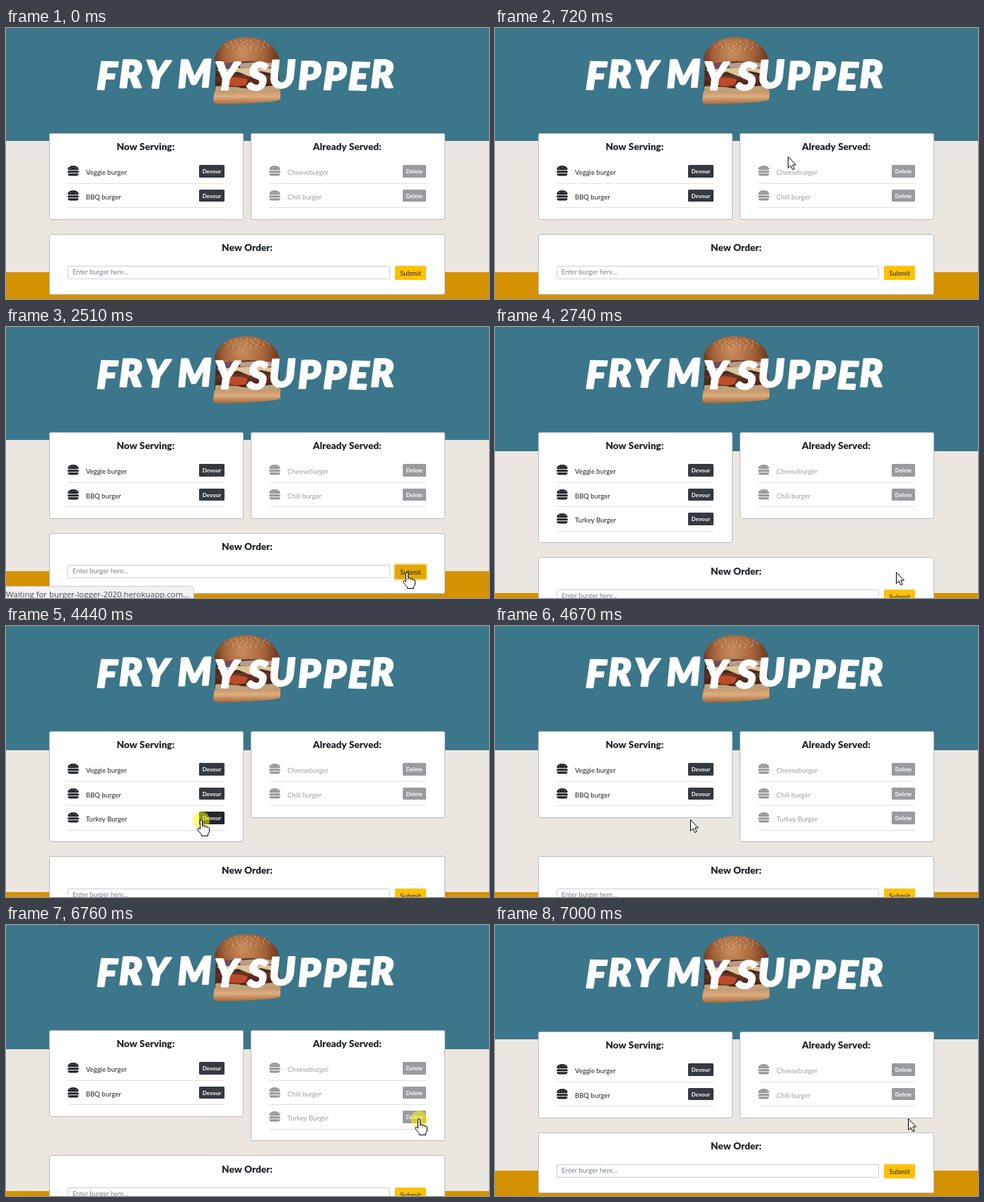
Animation, 683 px wide and 384 px high, one loop 7.93 s. Source, as an HTML page with a canvas:

```html
<!DOCTYPE html>
<html lang="en">
<head>
<meta charset="utf-8">
<title>Burger orders</title>
<style>
  html, body { margin: 0; width: 100%; height: 100%; overflow: hidden; background: #ebe7e0; }
  canvas { display: block; width: 683px; height: 384px; }
</style>
</head>
<body>
<canvas id="stage"></canvas>
<script>
const W = 683, H = 384, LOOP = 7930;
const canvas = document.getElementById('stage');
const ctx = canvas.getContext('2d');
const scale = window.devicePixelRatio || 1;
canvas.width = W * scale;
canvas.height = H * scale;

const INK = '#212529', MUTED = '#a19f9d';
const ROW_PITCH = 34.5;

// Pointer moves: the pointer jumps along each path in equal time steps.
const MOVES = [
  { start: 170, end: 400, steps: 4, path: [[658, -41], [474, 122]] },
  { start: 550, end: 1330, steps: 11, path: [[474, 122], [253, 342]] },
  { start: 1720, end: 2100, steps: 6, path: [[253, 342], [567, 347]] },
  { start: 3670, end: 4210, steps: 8, path: [[567, 347], [276, 274]] },
  { start: 5060, end: 5060, steps: 1, path: [[276, 274], [278, 275]] },
  { start: 5460, end: 6230, steps: 11, path: [[278, 275], [383, 281], [488, 285], [576, 280]] },
  { start: 6300, end: 6380, steps: 2, path: [[576, 280], [584, 274]] },
];
const CLICKS = [[1410, 1480], [2260, 2430], [4440, 4590], [6760, 6920]];
const STATUS = [[2430, 2740], [4590, 4670], [6920, 7000]];
const HAND = [[2100, 2740], [4210, 4670], [6230, 7000]];

const within = (t, spans) => spans.some(([a, b]) => t >= a && t < b);

function pointerAt(t) {
  const move = MOVES.filter(m => t >= m.start).pop();
  if (!move) return null;
  const { start, end, steps, path } = move;
  const gap = (end - start) / Math.max(1, steps - 1);
  const step = t >= end ? steps : Math.floor((t - start + 5) / gap) + 1;
  const along = step / steps * (path.length - 1);
  const i = Math.min(Math.floor(along), path.length - 2);
  const [a, b] = [path[i], path[i + 1]];
  return [0, 1].map(k => Math.round(a[k] + (b[k] - a[k]) * (along - i)));
}

function rect(x, y, w, h, fill, radius = 0, stroke) {
  ctx.beginPath();
  ctx.roundRect(x, y, w, h, radius);
  if (fill) { ctx.fillStyle = fill; ctx.fill(); }
  if (stroke) { ctx.strokeStyle = stroke; ctx.lineWidth = 1; ctx.stroke(); }
}

function shape(d, fill, stroke, width = 1) {
  const path = new Path2D(d);
  ctx.fillStyle = fill;
  ctx.fill(path);
  if (stroke) {
    ctx.strokeStyle = stroke;
    ctx.lineWidth = width;
    ctx.stroke(path);
  }
}

function text(str, x, y, size, color, { weight = 400, align = 'left', family = 'Lato' } = {}) {
  ctx.font = `${weight} ${size}px "${family}", sans-serif`;
  ctx.textAlign = align;
  ctx.fillStyle = color;
  ctx.fillText(str, x, y);
}

const heading = (str, x, y) => text(str, x, y, 13.6, INK, { weight: 900, align: 'center' });

function gradient(y0, y1, ...colors) {
  const g = ctx.createLinearGradient(0, y0, 0, y1);
  colors.forEach((c, i) => g.addColorStop(i / (colors.length - 1), c));
  return g;
}

function photo() {
  shape('M297 48Q340 44 385 48L387 92Q340 97 295 92Z', '#4a2a1e');
  shape('M295 89Q340 84 388 87L388 101Q383 104 378 104Q340 108 301 108Q293 108 293 102Z',
    gradient(86, 108, '#c18a5c', '#dcae80', '#a8683a'));
  shape('M296 83Q310 78 325 83T355 83T387 81L386 88Q340 93 296 89Z', '#bda27c');
  shape('M297 69Q340 64 386 68L387 81Q340 86 296 82Z', gradient(66, 84, '#6d3a26', '#432016'));
  shape('M312 71Q330 68 342 73L339 81Q326 85 311 80Z', '#bd4a28');
  shape('M298 59Q340 54 386 58L374 64L360 61L345 69L328 62L306 66Z', '#dcc49a');
  shape('M297 48Q312 45 330 51L328 57Q310 60 298 56Z', '#6d4c5c');
  shape('M330 50Q358 47 386 49L384 55Q356 59 331 56Z', '#b99c8c');
  const bun = ctx.createRadialGradient(334, 36, 3, 340, 36, 50);
  bun.addColorStop(0, '#c68a5a');
  bun.addColorStop(0.55, '#a3623a');
  bun.addColorStop(1, '#5f2f18');
  shape('M295 46C295 28 314 13 338 13C365 12 385 27 387 47Q382 51 370 49Q340 45 309 50Q297 52 295 46Z', bun);
  ctx.fillStyle = '#dcbd92';
  for (let i = 0; i < 46; i++) {
    const angle = i * 2.4, r = Math.sqrt(i / 46);
    ctx.beginPath();
    ctx.ellipse(341 + 34 * r * Math.cos(angle), 24 + 8 * r * Math.sin(angle), 1, 0.6, angle, 0, 7);
    ctx.fill();
  }
}

function markerWord(word, x, y) {
  ctx.font = 'italic 900 54px "Lato", sans-serif';
  ctx.textAlign = 'left';
  ctx.fillStyle = ctx.strokeStyle = '#fff';
  ctx.lineWidth = 2;
  ctx.lineJoin = 'round';
  [...word].forEach((letter, i) => {
    ctx.save();
    ctx.translate(x, y + 1.5 * Math.sin(i * 2.1 + x));
    ctx.rotate(0.03 * Math.sin(i * 3.7 + x));
    ctx.fillText(letter, 0, 0);
    ctx.strokeText(letter, 0, 0);
    ctx.restore();
    x += ctx.measureText(letter).width + 3;
  });
}

function burgerIcon(x, y, color) {
  ctx.save();
  ctx.translate(x, y);
  shape('M1.8 6.2Q0 6.2 .5 4.2Q2.5 0 8 0T15.5 4.2Q16 6.2 14.2 6.2Z', color);
  rect(0, 7.2, 16, 3, color, 1.5);
  shape('M.5 11.2H15.5V12Q15.5 14.4 13 14.4H3Q.5 14.4 .5 12Z', color);
  ctx.fillStyle = '#fff';
  for (const [dx, dy] of [[4.2, 3.6], [8, 2.2], [11.8, 3.6]]) ctx.fillRect(dx - 0.5, dy - 0.4, 1, 0.8);
  ctx.restore();
}

function orderCard(x, title, items, served, hovered) {
  const bottom = items.length === 3 ? 305.5 : 271.5;
  rect(x + 0.5, 149.5, 274, bottom - 149.5, '#fff', 2, '#b9babb');
  heading(title, x + 136.5, 173);
  items.forEach((item, i) => {
    const offset = i * ROW_PITCH;
    const top = Math.round(194 + offset);
    const height = Math.round(211.8 + offset) - top;
    const width = served ? 33 : 36;
    const fill = served ? '#999b9f' : hovered === i ? '#23272b' : '#343a40';
    burgerIcon(x + 26, top + 1, served ? '#979797' : INK);
    text(item, x + 52, top + 14, 9.5, served ? MUTED : INK);
    rect(x + 248 - width, top, width, height, fill, 1.5);
    text(served ? 'Delete' : 'Devour', x + 248 - width / 2, top + 11.5, 8, '#fff', { weight: 700, align: 'center' });
    rect(x + 26, Math.floor(220 + offset), 222, 1, '#dfe1e3');
  });
}

function orderForm(t, tall) {
  rect(61.5, tall ? 326.5 : 292.5, 559, 85, '#fff', 2, '#b9babb');
  const y = tall ? 35 : 0;
  heading('New Order:', 341, 316 + y);

  const focused = t >= 1410 && t < 2260;
  const filled = t >= 1550 && t < 2430;
  if (focused) rect(86, 336, 458, 21, '#bfdeff', 2);
  rect(87.5, 337.5 + y, 455, 18, '#fff', 1.5, focused ? '#80bdff' : '#ced0d2');
  text(filled ? 'Turkey Burger' : 'Enter burger here...', 94, 349 + y, 9.4, filled ? '#495057' : '#7b8188');
  if (t >= 1550 && t < 1720) rect(151, 341, 1, 10, '#222');

  const pressed = t >= 2260 && t < 2660;
  const hover = t >= 2100 && t < 2660;
  if (pressed) rect(548, 335 + y, 48, 24, '#f3d683', 3);
  rect(550, 337 + y, 44, 20, hover ? '#e0a800' : '#ffc107', 1.5);
  text('Submit', 572, 350.5 + y, 9.7, INK, { align: 'center' });
}

function page(t) {
  const tall = t >= 2660 && t < 7000;
  const serving = ['Veggie burger', 'BBQ burger'];
  const served = ['Cheeseburger', 'Chili burger'];
  if (t >= 2660 && t < 4670) serving.push('Turkey Burger');
  if (t >= 4670 && t < 7000) served.push('Turkey Burger');

  ctx.save();
  if (t >= 7000) ctx.translate(0, 2);
  rect(0, -2, W, H + 2, '#ebe7e0');
  rect(0, -2, W, tall ? 178 : 162, '#3c768a');
  rect(0, tall ? 377 : 346, W, 60, '#d49100');
  photo();
  markerWord('FRY', 128, 86);
  markerWord('MY', 243, 86);
  markerWord('SUPPER', 341, 86);
  orderCard(61, 'Now Serving:', serving, false, t >= 4210 && t < 4670 ? 2 : -1);
  orderCard(346, 'Already Served:', served, true);
  orderForm(t, tall);
  ctx.restore();
}

function statusBar() {
  rect(-2.5, 367.5, 268, 20, '#f2f2f2', [0, 3, 0, 0], '#c9c9c9');
  text('Waiting for burger-logger-2020.herokuapp.com...', 0, 383, 11.4, '#43474c', { family: 'Open Sans' });
}

function pointer(t) {
  const spot = pointerAt(t);
  if (!spot) return;
  ctx.save();
  ctx.translate(...spot);
  if (within(t, CLICKS)) {
    ctx.beginPath();
    ctx.arc(0, 1, 12, 0, 7);
    ctx.fillStyle = 'rgba(255, 255, 0, .5)';
    ctx.fill();
  }
  ctx.lineJoin = 'round';
  if (within(t, HAND)) {
    shape('M-1.5 14V2Q-1.5 .5 0 .5T1.5 2V8.5Q4.5 7 5 9.5Q8 8.5 8.3 11Q11.5 10.5 11.5 13V17' +
      'Q11.5 19 9.5 21V23.5H.5V21.5L-5 15Q-6 13 -4.5 12.3Q-3.5 12 -1.5 14Z', '#fff', '#000');
    shape('M1.5 8.5V11.5M5 9.5V12M8.3 11V12.5', 'transparent', '#000', 0.8);
  } else if (t >= 1330 && t < 1720) {
    shape('M-3 -6.5H-.5M1.5 -6.5H4M.5 -6V6M-3 6.5H-.5M1.5 6.5H4', 'transparent', '#000', 1.2);
  } else {
    shape('M.5 .5V16.5L4.2 13L6.8 18.7L9.4 17.5L6.8 12H11.5Z', '#fff', '#000');
  }
  ctx.restore();
}

function draw(t) {
  ctx.setTransform(scale, 0, 0, scale, 0, 0);
  page(t);
  if (within(t, STATUS)) statusBar();
  pointer(t);
}

const began = performance.now();
function frame() {
  draw((performance.now() - began) % LOOP);
  requestAnimationFrame(frame);
}
frame();
</script>
</body>
</html>
```
